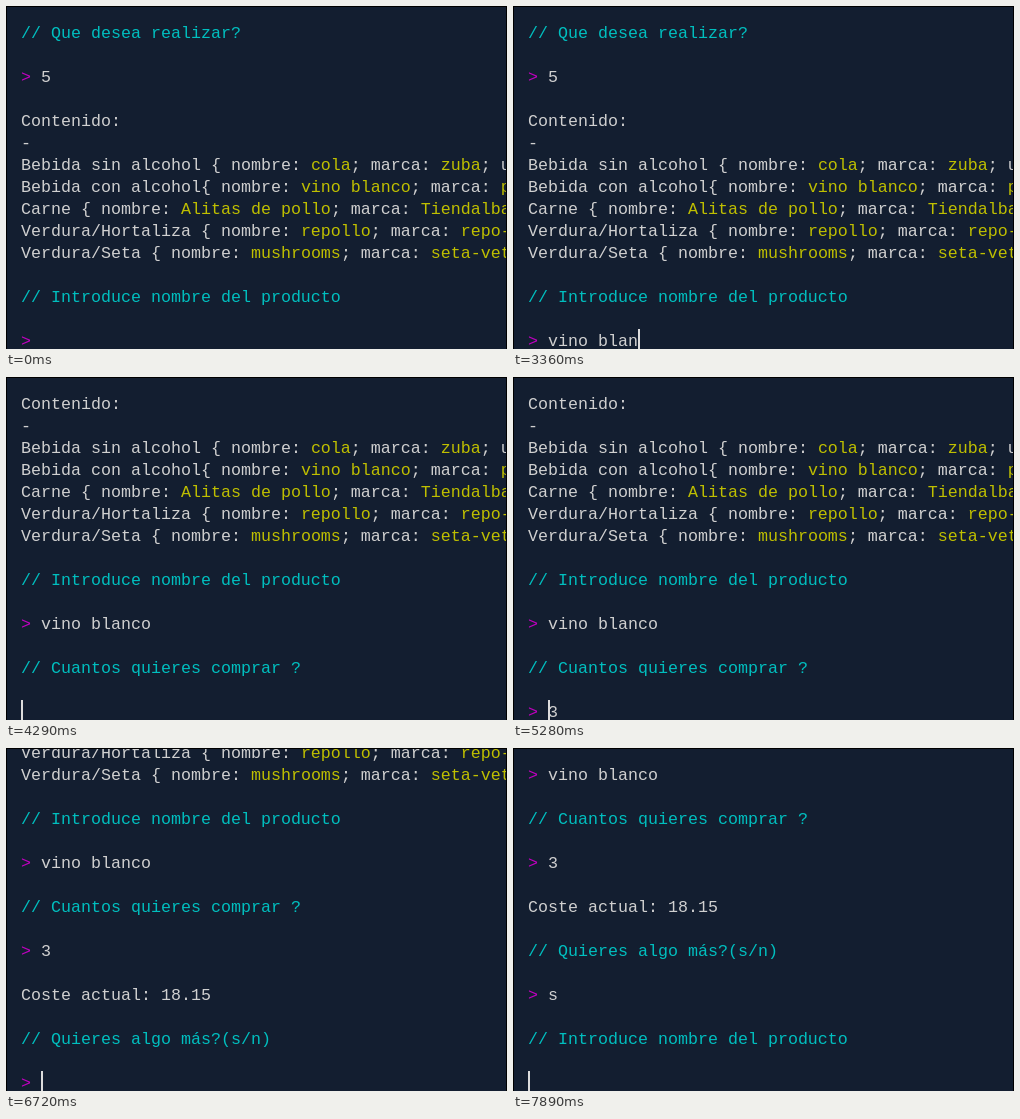
Write an HTML page that moves like this. It is 501x343 px and loops after 8 s.

```html
<!DOCTYPE html>
<html lang="es">
<head>
<meta charset="utf-8">
<title>Terminal</title>
<style>
  html, body { margin: 0; width: 100%; height: 100%; overflow: hidden; background: #131e30; }
  #screen {
    position: relative; box-sizing: border-box; width: 501px; height: 343px;
    overflow: hidden; border: 1px solid #000; border-bottom: 0;
  }
  #text {
    position: absolute; left: 14px; margin: 0; color: #d0d0d0;
    font: 16.67px/22px "Courier New", "Liberation Mono", monospace; font-variant-ligatures: none;
  }
  #cursor { position: absolute; top: 322px; width: 2px; height: 20px; background: #dcdcdc; }
  .question { color: #00bfbf; }
  .prompt { color: #bf00bf; }
  .value { color: #bfbf00; }
</style>
</head>
<body>
<div id="screen"><pre id="text"></pre><div id="cursor"></div></div>
<script>
const LOOP = 8000, ROW = 22, COL = 10, INPUT_ROW = 14;

const transcript = `// Que desea realizar?

> 5

Contenido:
-
Bebida sin alcohol { nombre: cola; marca: zuba; u
Bebida con alcohol{ nombre: vino blanco; marca: p
Carne { nombre: Alitas de pollo; marca: Tiendalba
Verdura/Hortaliza { nombre: repollo; marca: repo-
Verdura/Seta { nombre: mushrooms; marca: seta-vet

// Introduce nombre del producto

> vino blanco

// Cuantos quieres comprar ?

> 3

Coste actual: 18.15

// Quieres algo más?(s/n)

> s

// Introduce nombre del producto

`.split("\n");

// Each step: start time, rows scrolled, input line, cursor column (null = hidden)
const product = "vino blanco";
const keyTimes = [1710, 1800, 2010, 2190, 2670, 2910, 3030, 3150, 3360, 3570, 3720];
const steps = [
  [0, 0, "> ", null],
  [780, 0, "> ", 2],
  [1260, 0, "> ", null],
  ...keyTimes.map((time, i) => [time, 0, "> " + product.slice(0, i + 1), i + 3]),
  [4080, 0, "> " + product, 2],
  [4290, 4, "", 0],
  [4500, 4, "> ", 2],
  [5010, 4, "> ", null],
  [5160, 4, "> 3", 3],
  [5280, 4, "> 3", 2],
  [5490, 10, "", 0],
  [5730, 10, "> ", 2],
  [6210, 10, "> ", null],
  [6720, 10, "> ", 2],
  [7200, 10, "> ", null],
  [7320, 10, "> s", 3],
  [7680, 10, "> s", 2],
  [7890, 14, "", 0],
];

const text = document.getElementById("text");
const cursor = document.getElementById("cursor");
const span = (name, content) => `<span class="${name}">${content}</span>`;

function colorize(line) {
  if (line.startsWith("//")) return span("question", line);
  if (line.startsWith(">")) return span("prompt", "&gt;") + line.slice(1);
  return line.replace(/(nombre|marca): ([^;]+)/g, (_, key, value) => `${key}: ${span("value", value)}`);
}

function show([, scroll, input, column]) {
  const lines = [...transcript.slice(0, scroll + INPUT_ROW), input];
  text.innerHTML = lines.map(colorize).join("\n");
  text.style.top = 16 - scroll * ROW + "px";
  cursor.hidden = column === null;
  cursor.style.left = 14 + column * COL + "px";
}

let current;
function tick() {
  const time = performance.now() % LOOP;
  const step = steps.findLast(([start]) => start <= time);
  if (step !== current) show(current = step);
  requestAnimationFrame(tick);
}
tick();
</script>
</body>
</html>
```
